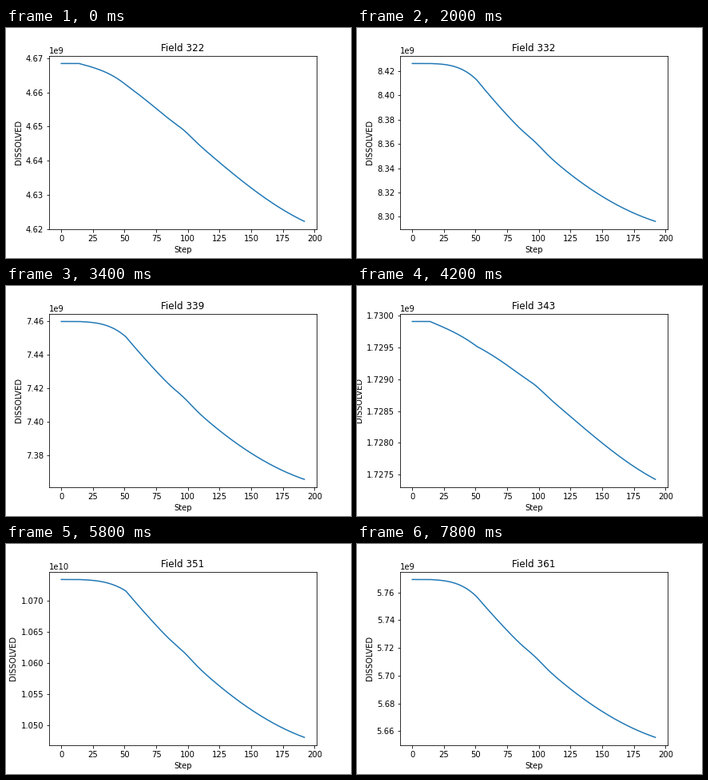
A matplotlib script for the animation above (8 s loop, 432 by 288 pixels).

```python
import numpy as np
import matplotlib.pyplot as plt
from matplotlib.animation import FuncAnimation

FIRST, COUNT, INTERVAL = 322, 40, 200
ONSET, KNEE, LAST = 14, 51, 192   # steps where the decline starts, bends, ends

# Key fields: start value and total drop (in 1e9), share of the drop lost
# before the knee, and how strongly the curve bows after it.
KEYS = {
    322: (4.66847, 0.0462, 0.135, -0.05),
    332: (8.4260, 0.1297, 0.105, 0.55),
    339: (7.4599, 0.0942, 0.097, 0.49),
    343: (1.72991, 0.002487, 0.158, -0.30),
    351: (10.7341, 0.2535, 0.073, 0.44),
    358: (5.42414, 0.1283, 0.112, 0.52),
    361: (5.76943, 0.11395, 0.110, 0.48),
}

steps = np.arange(LAST + 1)


def params(number):
    """Blend the key fields; the drop is blended on a log scale."""
    start, drop, early, bow = np.array(list(KEYS.values())).T
    start, log_drop, early, bow = (
        np.interp(number, list(KEYS), p) for p in (start, np.log(drop), early, bow))
    return start, np.exp(log_drop), early, bow


def decline(early, bow):
    """Share of the drop lost at each step: flat, gathering pace, then bowed."""
    t = np.clip((steps - ONSET) / (KNEE - ONSET), 0, 1)
    u = np.clip((steps - KNEE) / (LAST - KNEE), 0, 1)
    linear = 0.55 - 0.8 * bow
    head = linear * t + (1 - linear) * t ** 3
    tail = u + u * (1 - u) * (bow + (0.4 - 0.65 * bow) * u)
    tail -= 0.012 * np.exp(-((steps - 97) / 9) ** 2)   # short slow spell
    return early * head + (1 - early) * tail


def field_values(number):
    start, drop, early, bow = params(number)
    return 1e9 * (start - drop * decline(early, bow))


fig = plt.figure(figsize=(6, 4), dpi=72, facecolor="white")
fig.subplots_adjust(left=0.125, right=0.9, bottom=0.125, top=0.88)
ax = fig.add_subplot()


def draw(frame):
    number = FIRST + frame
    ax.clear()
    ax.plot(steps, field_values(number))
    ax.set_title(f"Field {number}")
    ax.set_xlabel("Step")
    ax.set_ylabel("DISSOLVED")
    return ax.lines


anim = FuncAnimation(fig, draw, frames=COUNT, interval=INTERVAL,
                     init_func=lambda: draw(0), repeat=True, repeat_delay=0)
plt.show()
```
